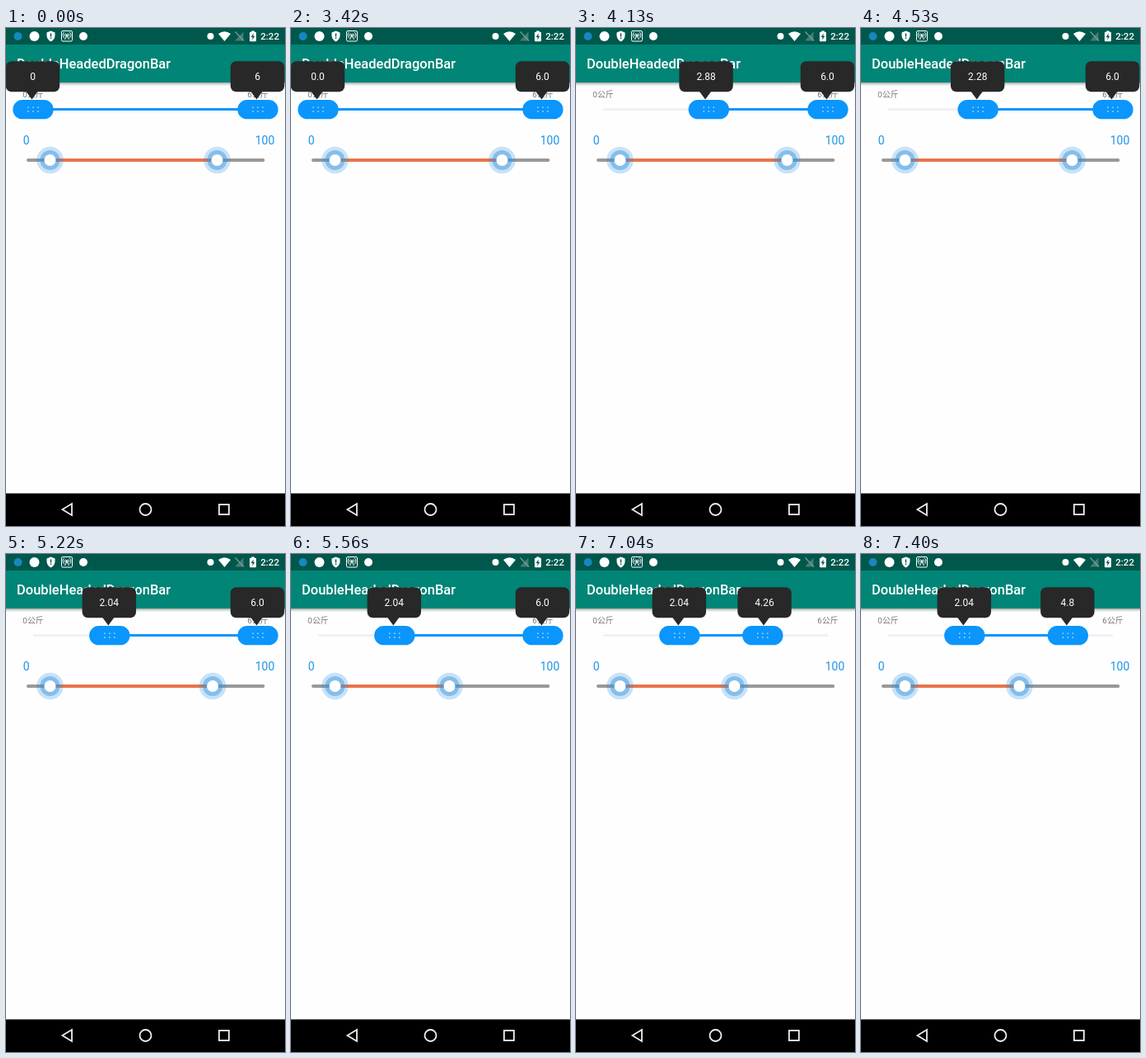
Recreate the animation shown at these times as an HTML page with a canvas. Size 339 by 603 pixels, loop 7.42 s.

```html
<!DOCTYPE html>
<html lang="zh">
<head>
<meta charset="utf-8">
<title>DoubleHeadedDragonBar</title>
<style>
  html, body { margin: 0; width: 100%; height: 100%; overflow: hidden; background: #fefefe; }
  canvas { display: block; }
</style>
</head>
<body>
<canvas id="stage" width="339" height="603"></canvas>
<script>
const ctx = document.getElementById('stage').getContext('2d');
const LOOP = 7420;
const FONT = 'Roboto, "Noto Sans CJK SC", "Noto Sans CJK", sans-serif';
const BLUE = '#0a96fd';

// [time, value] pairs, linear in between
const LOW_KEYS = [[3440, 0], [3690, .9], [3710, .96], [3730, .96], [4120, 2.88], [4190, 2.88],
  [4490, 2.4], [4510, 2.4], [4530, 2.28], [4650, 2.04]];
const HIGH_KEYS = [[6420, 6], [6650, 5.1], [6670, 4.8], [6690, 4.8], [7060, 4.2], [7160, 4.2], [7350, 4.8]];
const THUMB_KEYS = [[5190, 256.5], [5290, 239], [5460, 202], [5560, 192.5]];

function sample(keys, t) {
  if (t <= keys[0][0]) return keys[0][1];
  for (let i = 1; i < keys.length; i++) {
    const [t0, a] = keys[i - 1], [t1, b] = keys[i];
    if (t < t1) return a + (b - a) * (t - t0) / (t1 - t0);
  }
  return keys[keys.length - 1][1];
}

// The bar moves in whole percents of 6
const valueAt = (keys, t) => Math.round(sample(keys, t) / .06) * 6 / 100;
const valueX = v => 33 + v * 45.5;

function box(x, y, w, h, color, r = 0) {
  ctx.fillStyle = color;
  ctx.beginPath();
  ctx.roundRect(x, y, w, h, r);
  ctx.fill();
}

function disc(x, y, r, color) {
  ctx.fillStyle = color;
  ctx.beginPath();
  ctx.arc(x, y, r, 0, 2 * Math.PI);
  ctx.fill();
}

function path(points, color) {
  ctx.fillStyle = color;
  ctx.beginPath();
  points.forEach(p => ctx.lineTo(...p));
  ctx.closePath();
  ctx.fill();
}

function line(x0, y0, x1, y1, width, color, cap = 'butt') {
  ctx.strokeStyle = color;
  ctx.lineWidth = width;
  ctx.lineCap = cap;
  ctx.beginPath();
  ctx.moveTo(x0, y0);
  ctx.lineTo(x1, y1);
  ctx.stroke();
}

function label(text, x, y, size, color, align = 'left', weight = 400) {
  ctx.font = `${weight} ${size}px ${FONT}`;
  ctx.fillStyle = color;
  ctx.textAlign = align;
  ctx.fillText(text, x, y);
}

function drawStatusBar() {
  box(0, 0, 339, 20, '#00574b');
  disc(14.5, 10, 5, '#1788bd');
  disc(34.5, 10, 6, '#fff');
  disc(94, 10, 5, '#fff');
  disc(248.5, 10, 4, '#fff');

  // shield
  ctx.fillStyle = '#fff';
  ctx.beginPath();
  ctx.moveTo(54.5, 3.5);
  ctx.lineTo(59.5, 5.5);
  ctx.lineTo(59.5, 9.5);
  ctx.quadraticCurveTo(59, 14, 54.5, 16.5);
  ctx.quadraticCurveTo(50, 14, 49.5, 9.5);
  ctx.lineTo(49.5, 5.5);
  ctx.fill();
  line(54.5, 6.5, 54.5, 10.5, 1.5, '#00574b');
  box(53.75, 11.5, 1.5, 1.5, '#00574b');

  // broadcast
  ctx.strokeStyle = '#fff';
  ctx.lineWidth = 1;
  ctx.beginPath();
  ctx.roundRect(67.5, 3.5, 13, 12.5, 1.5);
  ctx.stroke();
  for (const r of [2.5, 4.8]) {
    for (const mid of [0, Math.PI]) {
      ctx.beginPath();
      ctx.arc(74, 8.5, r, mid - .9, mid + .9);
      ctx.stroke();
    }
  }
  disc(74, 8.5, 1.2, '#fff');
  line(74, 9, 71.5, 14, 1, '#fff');
  line(74, 9, 76.5, 14, 1, '#fff');

  // wifi
  ctx.fillStyle = '#fff';
  ctx.beginPath();
  ctx.moveTo(265.5, 16);
  ctx.lineTo(258, 7);
  ctx.quadraticCurveTo(265.5, 1.5, 273, 7);
  ctx.fill();

  // no signal
  path([[288.5, 4.5], [288.5, 15.5], [278, 15.5]], '#447d73');
  line(278.5, 4.5, 289, 15.5, 1.2, '#799f98');

  // battery
  box(298.2, 3.5, 3.6, 2, '#fff');
  box(296, 4.7, 8, 11.5, '#fff', 1);
  path([[300.7, 6.5], [297.7, 11], [299.6, 11], [299.3, 14.5], [302.3, 9.8], [300.4, 9.8]], '#00574b');
  label('2:22', 332, 14.3, 11.6, '#fff', 'right', 500);
}

function drawAppBar() {
  const shade = ctx.createLinearGradient(0, 66, 0, 70);
  shade.addColorStop(0, 'rgba(0,0,0,.32)');
  shade.addColorStop(1, 'rgba(0,0,0,0)');
  box(0, 66, 339, 4, shade);
  box(0, 20, 339, 46, '#008577');
  label('DoubleHeadedDragonBar', 13, 49, 16.5, '#fff', 'left', 500);
}

function drawNavBar() {
  box(0, 563.5, 339, 39.5, '#000');
  ctx.strokeStyle = '#eee';
  ctx.lineWidth = 1.8;
  ctx.beginPath();
  ctx.moveTo(68.5, 583);
  ctx.lineTo(80, 576);
  ctx.lineTo(80, 590);
  ctx.closePath();
  ctx.stroke();
  ctx.beginPath();
  ctx.arc(169.5, 583, 7, 0, 2 * Math.PI);
  ctx.stroke();
  ctx.strokeRect(258.9, 577, 12, 12);
}

function drawHandle(x) {
  box(x - 24.7, 87, 49.4, 23.3, BLUE, 11.6);
  for (const dx of [-6, 0, 6])
    for (const y of [96.2, 101]) disc(x + dx, y, .9, '#9bd3ff');
}

function drawBubble(x, text) {
  box(x - 32.7, 40.3, 65.4, 36.9, '#282828', 7);
  path([[x - 8, 77], [x + 6, 77], [x - 1, 86.5]], '#282828');
  label(text, x, 63, 12, '#fff', 'center');
}

function formatValue(v, t) {
  if (!Number.isInteger(v)) return String(v);
  return t < 3420 ? String(v) : v.toFixed(1);
}

function drawWeightBar(t) {
  const keySets = [LOW_KEYS, HIGH_KEYS];
  // Handles trail the number, bubbles trail the handles
  const [low, high] = keySets.map(keys => valueX(valueAt(keys, t - 20)));
  label('0公斤', 33, 84, 9.9, '#777', 'center');
  label('6公斤', 306, 84, 9.9, '#777', 'center');
  line(33, 98.5, 306, 98.5, 3, '#f0f0f8');
  line(low, 98.5, high, 98.5, 3.2, BLUE);
  drawHandle(low);
  drawHandle(high);
  for (const keys of keySets)
    drawBubble(valueX(valueAt(keys, t - 40)) - .5, formatValue(valueAt(keys, t), t));
}

function drawThumb(x) {
  disc(x, 160, 16.3, 'rgba(34,140,226,.25)');
  disc(x, 160, 12, 'rgba(60,150,220,.48)');
  disc(x, 160, 7, '#fff');
}

function drawRangeBar(t) {
  const low = 53.5, high = sample(THUMB_KEYS, t);
  label('0', 20.8, 140.7, 14, '#1e95e8');
  label('100', 326.3, 140.7, 14, '#1e95e8', 'right');
  line(27, 160, 312.3, 160, 4.2, '#999', 'round');
  line(low, 160, high, 160, 4.2, '#e77549');
  drawThumb(low);
  drawThumb(high);
}

function draw() {
  const t = performance.now() % LOOP;
  box(0, 0, 339, 603, '#fefefe');
  drawStatusBar();
  drawAppBar();
  drawRangeBar(t);
  drawWeightBar(t);
  drawNavBar();
  requestAnimationFrame(draw);
}
draw();
</script>
</body>
</html>
```
